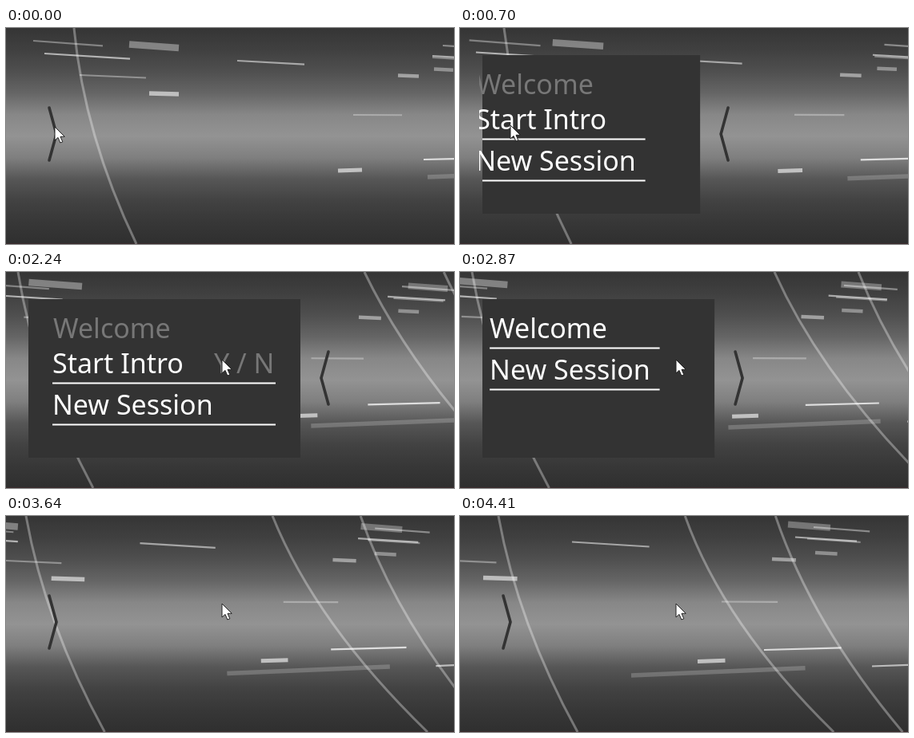
These frames come from a looping animation (560x271 px, 4.48 s). An HTML page with a canvas:

```html
<!DOCTYPE html>
<html lang="en">
<head>
<meta charset="utf-8">
<title>Sliding menu</title>
<style>
html, body { margin: 0; width: 100%; height: 100%; overflow: hidden; background: #333; }
canvas { display: block; }
</style>
</head>
<body>
<canvas id="stage" width="560" height="271"></canvas>
<script>
const ctx = document.getElementById('stage').getContext('2d');
const W = 560, H = 271, LOOP = 4480, STEP = 70, END = 4410;

// Left end x, y, length, travel, drop, opacity
const lines = [
  [34, 16, 87, 150, -4, .36],
  [48, 32, 107, 188, -10, .6],
  [92, 59, 83, 142, -5, .36],
  [289, 41, 84, 149, -8.5, .52],
  [434, 109, 61, 107, -1.5, .3],
  [533, 35, 67, 114, -8.5, .55],
  [533, 37, 58, 99, -8.5, .35],
  [546, 22, 61, 104, -8, .4],
  [522, 165, 84, 142, 3, .75],
  [636, 186, 74, 121, 2.5, .6]
];

// As above, then thickness, growth and acceleration
const bars = [
  [154, 20.5, 62, 256, -15.5, .36, 8.5],
  [179, 82, 37, 150, -4.5, .58, 5.5],
  [490, 59.5, 26, 100, -5.5, .46, 4.5],
  [535, 51.5, 24, 91, -5.5, .38, 4.5],
  [592, 24, 46, 182, -13.5, .3, 8],
  [415, 179, 30, 118, 3.5, .6, 5],
  [527, 187, 147, 313, 13, .2, 5.5, .48, .17]
];

// The near arc swings back: x of its upper end at these times
const swingTimes = [0, 700, 1340, 2240, 2870, 3640, 4410];
const swing = [85, 55, 28, 15, 15, 25, 48];

// Far arcs: place, speed and acceleration of top, middle and bottom
const farArcs = [
  [[393, -83, 6.8], [473, -88, 6], [592, -88, 4.5]],
  [[498, -75, 5], [568, -86, 9], [672, -94, 11]]
];

const shades = [53, 64, 79, 101, 135, 147, 127, 86, 66, 55, 47];
const backdrop = ctx.createLinearGradient(0, 0, 0, H);
shades.forEach((v, i) => backdrop.addColorStop(i / 10, `rgb(${v},${v},${v})`));

const mix = (a, b, p) => a + (b - a) * p;
const clamp = v => Math.min(1, Math.max(0, v));
const ease = p => p < .5 ? 2 * p * p : 1 - 2 * (1 - p) ** 2;
const span = (t, from, to) => ease(clamp((t - from) / (to - from)));

// Smooth interpolation through unevenly spaced values
function spline(times, v, t) {
  const last = times.length - 1;
  let i = 0;
  while (i < last - 1 && t > times[i + 1]) i++;
  const slope = k => {
    const a = Math.max(0, k - 1), b = Math.min(last, k + 1);
    return (v[b] - v[a]) / (times[b] - times[a]);
  };
  const h = times[i + 1] - times[i], u = (t - times[i]) / h;
  return mix(v[i], v[i + 1], u * u * (3 - 2 * u)) +
    h * u * (1 - u) * (slope(i) * (1 - u) - slope(i + 1) * u);
}

function stroke(points, width, color) {
  ctx.lineWidth = width;
  ctx.strokeStyle = color;
  ctx.beginPath();
  points.forEach(([x, y]) => ctx.lineTo(x, y));
  ctx.stroke();
}

// Streaks tilt more the farther they are from the bright band
function drawStreak(u, [x, y, length, travel, drop, alpha, width = 2.2, growth = .15, accel = .07]) {
  const p = u * (1 - accel + accel * u);
  const left = x - travel * p, top = y + drop * p, run = length * (1 + growth * p);
  const tilt = (115 - top) * (top < 115 ? .00075 : .0005);
  stroke([[left, top], [left + run, top + run * tilt]], width, `rgba(255,255,255,${alpha})`);
}

function drawArc([top, middle, bottom]) {
  ctx.lineWidth = 3;
  ctx.strokeStyle = 'rgba(255,255,255,.33)';
  ctx.beginPath();
  ctx.moveTo(top, 0);
  ctx.quadraticCurveTo(2 * middle - (top + bottom) / 2, H / 2, bottom, H);
  ctx.stroke();
}

function drawScene(t) {
  ctx.fillStyle = backdrop;
  ctx.fillRect(0, 0, W, H);
  ctx.fillStyle = '#3a2a2c';
  ctx.fillRect(0, H - 1, W, 1);

  const u = t / END;
  for (const streak of [...lines, ...bars]) drawStreak(u, streak);

  const near = spline(swingTimes, swing, t), lean = 1 - (1 - u) ** 2;
  drawArc([near, near + 26 + 11 * lean, near + 78 + 21 * lean]);
  const s = (t - 2870) / 1000;
  for (const arc of farArcs) drawArc(arc.map(([x, v, a]) => x + v * s + a * s * s));
}

function drawMenu(t) {
  const asked = t >= 1260 && t < 2590, answered = t >= 2590;
  const open = span(t, 250, 850) - span(t, 2760, 3360);
  const shift = (open - 1) * 311;
  const right = (asked ? 368 : 339) + shift;

  if (open > 0) {
    ctx.fillStyle = '#333';
    ctx.fillRect(28, 34, right - 28, 199);
    ctx.save();
    ctx.beginPath();
    ctx.rect(24, 34, right - 24, 199);
    ctx.clip();
    ctx.font = '500 34px "Noto Sans", "Open Sans", sans-serif';
    const label = (text, x, y, color) => {
      ctx.fillStyle = color;
      ctx.fillText(text, x + shift, y);
    };
    const item = (text, y) => {
      label(text, 58, y, '#fff');
      const x0 = Math.max(28, 58 + shift), x1 = (asked ? 337 : 270.5) + shift;
      if (x1 > x0) ctx.fillRect(x0, y + 11.5, x1 - x0, 2);
    };
    if (answered) {
      item('Welcome', 83);
      item('New Session', 135);
    } else {
      label('Welcome', 59, 83, '#777');
      item('Start Intro', 127);
      item('New Session', 179);
    }
    if (asked) label('Y / N', 260, 127, '#777');
    ctx.restore();
  }

  const pointsLeft = t > 250 && t < 2760;
  const tip = right + (pointsLeft ? 26 : 35), tail = right + (pointsLeft ? 35 : 26);
  ctx.lineCap = ctx.lineJoin = 'round';
  stroke([[tail, 100], [tip, 133], [tail, 166]], 3.6, '#333');
  ctx.lineCap = 'butt';
}

const pointer = new Path2D('M0 0V17L4 13.4 6.8 20 9.8 18.8 7 12.3H12.3Z');

function drawCursor(t) {
  const a = span(t, 0, 600), b = span(t, 720, 1200), c = span(t, 1620, 2170);
  const x = 61 + 2 * a + 77 * b + 130 * c, y = 124 - 2 * a - 6 * b - 6 * c;
  if ((t >= 1260 && t < 1500) || (t >= 2380 && t < 2600)) {
    ctx.fillStyle = 'rgba(196,190,22,.82)';
    ctx.beginPath();
    ctx.arc(x, y, 15.5, 0, 7);
    ctx.fill();
  }
  ctx.save();
  ctx.translate(x, y);
  ctx.lineJoin = 'miter';
  ctx.fillStyle = '#fff';
  ctx.fill(pointer);
  ctx.lineWidth = 1;
  ctx.strokeStyle = '#222';
  ctx.stroke(pointer);
  ctx.restore();
}

const start = performance.now();
function frame() {
  const t = Math.floor((performance.now() - start) % LOOP / STEP) * STEP;
  drawScene(t);
  drawMenu(t);
  drawCursor(t);
  requestAnimationFrame(frame);
}
frame();
</script>
</body>
</html>
```
